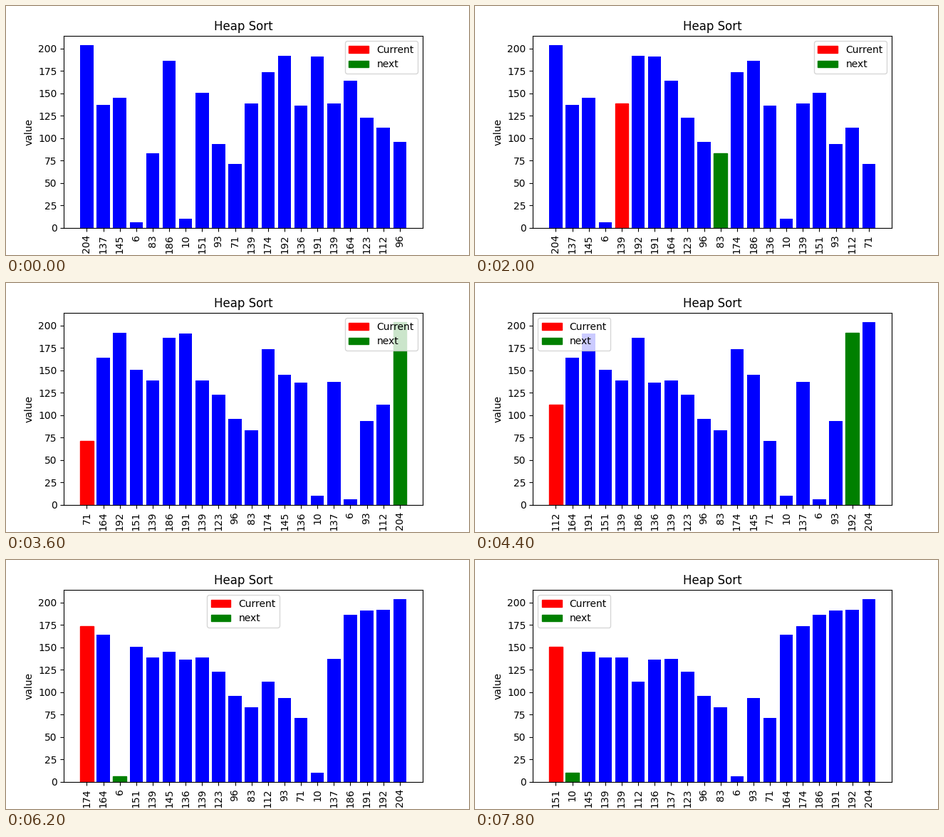
A matplotlib script that plays this animation: 650 px wide and 350 px high, repeating every 8000 ms.

```python
from itertools import islice

import matplotlib.pyplot as plt
from matplotlib.animation import FuncAnimation
from matplotlib.patches import Patch

FRAMES = 40
INTERVAL = 200
VALUES = [204, 137, 145, 6, 83, 186, 10, 151, 93, 71,
          139, 174, 192, 136, 191, 139, 164, 123, 112, 96]


def swap(a, i, j):
    a[i], a[j] = a[j], a[i]
    return a[:], i, j


def sift_down(a, root, size):
    """Yield a state after every swap that restores the heap below root."""
    while True:
        largest = root
        for child in (2 * root + 1, 2 * root + 2):
            if child < size and a[child] > a[largest]:
                largest = child
        if largest == root:
            return
        yield swap(a, root, largest)
        root = largest


def heap_sort(values):
    a = values[:]
    yield a[:], None, None
    for _ in range(4):  # hold on the first pair
        yield a[:], 0, 1
    for root in reversed(range(len(a) // 2)):
        yield from sift_down(a, root, len(a))
    for end in reversed(range(1, len(a))):
        yield swap(a, 0, end)
        yield from sift_down(a, 0, end)


states = list(islice(heap_sort(VALUES), FRAMES))
fig, ax = plt.subplots(figsize=(6.5, 3.5), dpi=100)


def draw(frame):
    values, current, following = states[frame]
    ax.clear()
    bars = ax.bar(range(len(values)), values, color="blue")
    if current is not None:
        bars[current].set_color("red")
        bars[following].set_color("green")
    ax.set_xticks(range(len(values)), values, rotation=90)
    ax.set_title("Heap Sort")
    ax.set_ylabel("value")
    ax.legend(handles=[Patch(color="red", label="Current"),
                       Patch(color="green", label="next")], loc="best")
    return []


anim = FuncAnimation(fig, draw, frames=FRAMES, interval=INTERVAL,
                     init_func=lambda: draw(0), repeat=True)
plt.show()
```
